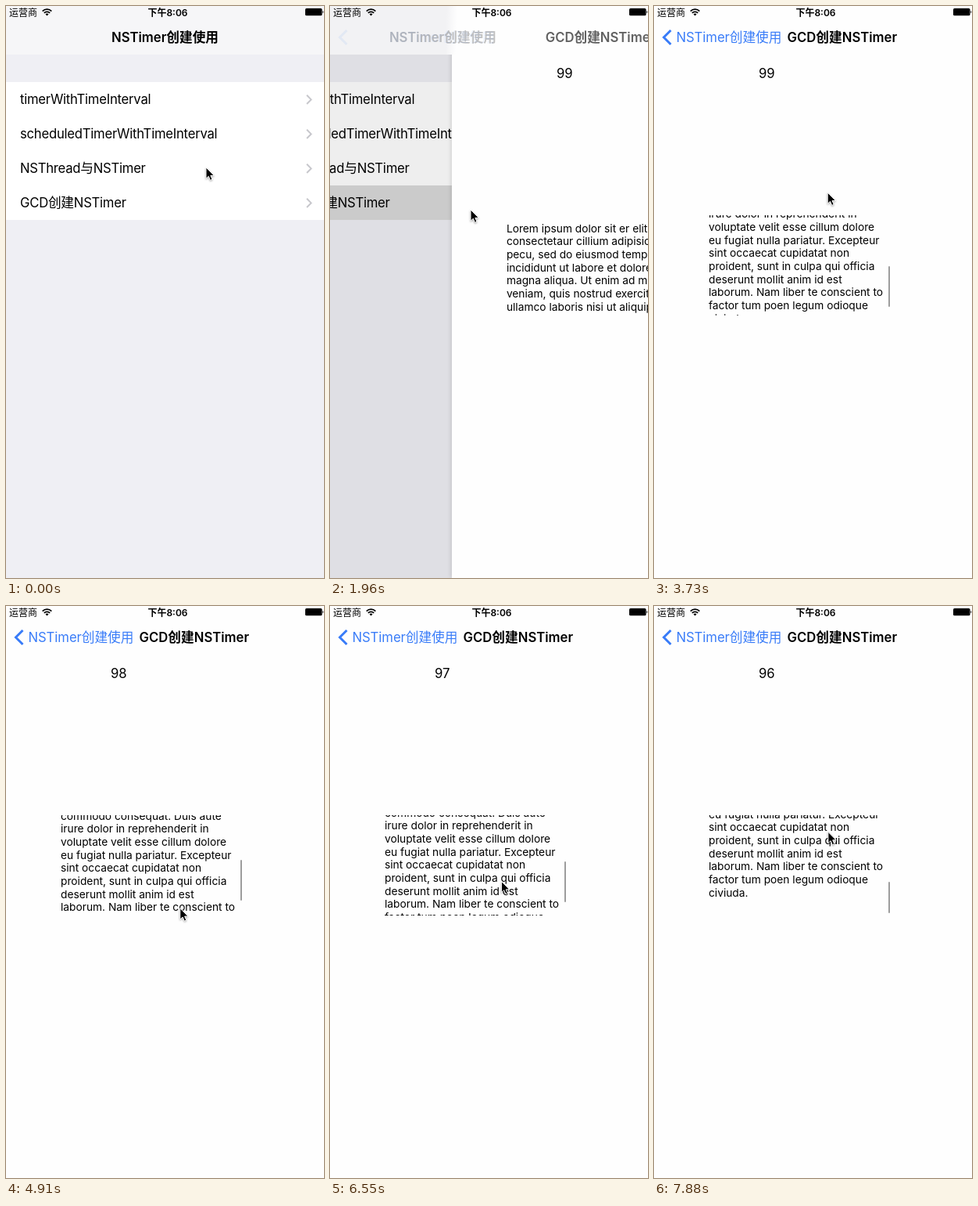
Write an HTML page that moves like this. It is 407 px wide and 730 px high and loops after 8000 ms.

```html
<!DOCTYPE html>
<html lang="zh">
<head>
<meta charset="utf-8">
<title>Timer list</title>
<style>
html, body { margin: 0; width: 100%; height: 100%; overflow: hidden; background: #fefefe; }
#stage {
  position: relative; width: 407px; height: 730px; overflow: hidden; background: #efeff4;
  font: 16.7px/44px Inter, "Noto Sans CJK SC", "Noto Sans CJK", sans-serif;
  color: #000; white-space: nowrap;
}
#stage div, #stage svg { position: absolute; }
svg { overflow: visible; fill: none; }
#list, #page, #dim, #paper { left: 0; top: 0; width: 407px; height: 730px; }
.row { left: 0; width: 407px; height: 44px; background: #fff; text-indent: 18px; letter-spacing: -.25px; }
.row svg { left: 384px; top: 15.5px; stroke: #c7c7cc; stroke-width: 2; }
#dim { background: #000; }
#paper { background: #fefefe; box-shadow: 0 0 6px rgba(0, 0, 0, .2); }
#count { left: 134px; top: 64px; }
#view { left: 65px; top: 267px; width: 240px; height: 128px; overflow: hidden; }
#text { left: 5px; top: 8.6px; font-size: 13.76px; line-height: 16.7px; white-space: pre; }
#bar { left: 299.5px; width: 2.4px; border-radius: 1.2px; background: rgba(0, 0, 0, .38); }
#nav { left: 0; top: 0; width: 407px; height: 62px; overflow: hidden; background: #f6f6f7; }
#glass { top: 0; width: 450px; height: 62px; background: linear-gradient(92deg, #fefefe00, #fefefe 14px); }
#nav .title { top: 18px; left: 0; font-weight: 600; }
#back { top: 18px; left: 0; color: #397cf8; letter-spacing: -.05px; }
#arrow { left: 10px; top: 30px; stroke: #397cf8; stroke-width: 3; }
.status { top: 0; font-size: 12px; line-height: 17px; }
#clock { left: 0; width: 414px; text-align: center; font-weight: 600; }
#cursor { left: 0; top: 0; filter: drop-shadow(0 1px 1px rgba(0, 0, 0, .35)); }
</style>
</head>
<body>
<div id="stage">
  <div id="list"></div>
  <div id="dim"></div>
  <div id="page">
    <div id="paper"></div>
    <div id="count">99</div>
    <div id="view"><div id="text">Lorem ipsum dolor sit er elit lamet,
consectetaur cillium adipisicing
pecu, sed do eiusmod tempor
incididunt ut labore et dolore
magna aliqua. Ut enim ad minim
veniam, quis nostrud exercitation
ullamco laboris nisi ut aliquip ex ea
commodo consequat. Duis aute
irure dolor in reprehenderit in
voluptate velit esse cillum dolore
eu fugiat nulla pariatur. Excepteur
sint occaecat cupidatat non
proident, sunt in culpa qui officia
deserunt mollit anim id est
laborum. Nam liber te conscient to
factor tum poen legum odioque
civiuda.</div></div>
    <div id="bar"></div>
  </div>
  <div id="nav">
    <div id="glass"></div>
    <svg id="arrow" width="13" height="20"><path d="M11.5 1L2.5 10l9 9"/></svg>
    <div id="oldTitle" class="title">NSTimer创建使用</div>
    <div id="back">NSTimer创建使用</div>
    <div id="newTitle" class="title">GCD创建NSTimer</div>
  </div>
  <div class="status" style="left:4px">运营商</div>
  <svg style="left:46px;top:3px" width="13" height="10" stroke="#000" stroke-width="1.7">
    <path d="M.7 3.6a8.2 8.2 0 0 1 11.6 0M2.8 5.9a5.2 5.2 0 0 1 7.4 0"/>
    <path d="M6.5 9.6L4.5 7.5a2.8 2.8 0 0 1 4 0z" fill="#000" stroke="none"/>
  </svg>
  <div class="status" id="clock">下午8:06</div>
  <svg style="left:383px;top:3px" width="24" height="9">
    <rect width="21.5" height="9.3" rx="1.6" fill="#000"/>
    <path d="M22.3 3q2 1.7 0 3.4z" fill="#000"/>
  </svg>
  <svg id="cursor" width="12" height="18">
    <path d="M0 0V14.3L3.3 11.3 5.5 16.4 8 15.3 5.8 10.4H10.3Z" fill="#000" stroke="#fff" stroke-width="1"/>
  </svg>
</div>
<script>
const LOOP = 8000, STEP = 148, TAP = 1800, MAX = 173;

// Turning points of the pointer: time, x, y
const turns = [
  [0, 256, 206], [740, 180, 253], [1040, 180, 260], [1950, 180, 260], [2690, 223, 390],
  [2990, 223, 390], [4020, 222, 200], [5230, 223, 425], [5700, 220, 305], [6250, 220, 305],
  [6780, 219, 388], [LOOP, 223, 285]
];
// Drags: start, end, pointer height at zero scroll
const drags = [[2990, 4030, 390], [4700, 5650, 519], [6388, LOOP, 488]];

const ui = {};
document.querySelectorAll('[id]').forEach(e => ui[e.id] = e);
const clamp = v => Math.max(0, Math.min(1, v));
const mix = (a, b, k) => a + (b - a) * k;
const smooth = k => k * k * (3 - 2 * k);
const move = (e, x, y = 0) => e.style.transform = `translate(${x}px,${y}px)`;
const fade = (e, v) => e.style.opacity = v;

const rows = ['timerWithTimeInterval', 'scheduledTimerWithTimeInterval', 'NSThread与NSTimer', 'GCD创建NSTimer']
  .map((label, i) => {
    const row = document.createElement('div');
    row.className = 'row';
    row.style.top = 97 + 44 * i + 'px';
    row.innerHTML = label + '<svg width="8" height="13"><path d="M1 .8L6.5 6.4 1 12"/></svg>';
    ui.list.append(row);
    return row;
  });

function pointer(t) {
  const i = turns.findIndex(k => k[0] > t);
  const [t0, x0, y0] = turns[i - 1], [t1, x1, y1] = turns[i];
  const k = smooth((t - t0) / (t1 - t0));
  return [mix(x0, x1, k), mix(y0, y1, k)];
}

// The text follows the drag, resists past its end and springs back on release
function scroll(t) {
  const drag = drags.filter(d => d[0] <= t).pop();
  if (!drag) return { pos: 0, bar: 0 };
  const [start, end, base] = drag;
  let pos = Math.max(0, base - pointer(Math.min(t, end))[1]);
  if (pos > MAX) pos = mix(MAX, pos, .46);
  if (t > end) pos = mix(MAX, pos, Math.exp((end - t) / 90));
  return { pos, bar: clamp(1 - (t - end - 200) / 300) };
}

function sample(t) {
  const origin = t < TAP + 25 ? -8 : 1948;
  return Math.max(0, origin + 8 * (origin < 0) + Math.floor((t - origin) / STEP) * STEP);
}

function draw(t) {
  const w = Math.max(0, t - TAP) * .0141;
  const p = w > 9 ? 1 : 1 - (1 + w) * Math.exp(-w);

  rows[3].style.background = t >= TAP ? '#d9d9d9' : '#fff';
  move(ui.list, -125 * p);
  fade(ui.dim, p * .105);
  move(ui.page, 407 * (1 - p));
  ui.page.style.visibility = p > 0 ? 'visible' : 'hidden';

  const tint = mix(246, 239, p);
  ui.nav.style.backgroundColor = `rgb(${tint},${tint},${tint + 2})`;
  move(ui.glass, mix(407, -20, p) + 22 * p);
  const titleX = mix(135, 28.5, Math.pow(p, 1.22));
  move(ui.oldTitle, titleX);
  move(ui.back, titleX);
  move(ui.newTitle, mix(445, 170.5, p));
  fade(ui.oldTitle, Math.pow(1 - p, 1.5));
  fade(ui.newTitle, p);
  const blue = clamp((p - .58) / .42);
  fade(ui.back, blue);
  fade(ui.arrow, blue);
  ui.glass.style.left = -20 * smooth(p) * p + 'px';

  ui.count.textContent = 99 - Math.max(0, Math.floor((t - TAP) / 2000));
  const { pos, bar } = scroll(t);
  move(ui.text, 0, -pos);
  const top = 271 + .4 * Math.min(pos, MAX), over = Math.max(0, pos - MAX);
  ui.bar.style.top = top + over + 'px';
  ui.bar.style.height = 52 - over + 'px';
  fade(ui.bar, bar);

  move(ui.cursor, ...pointer(t));
}

function tick() {
  draw(sample(performance.now() % LOOP));
  requestAnimationFrame(tick);
}
tick();
</script>
</body>
</html>
```
